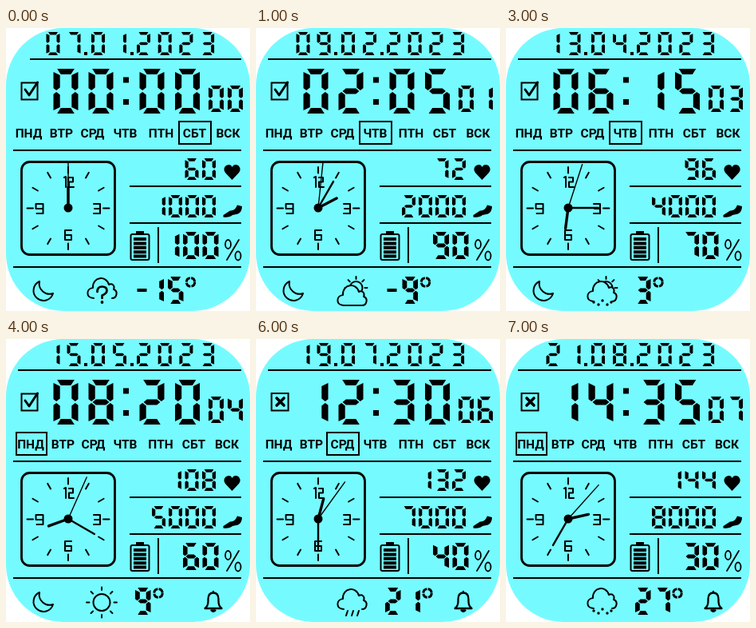
Write an HTML page that moves like this. It is 306x354 px and loops after 8 s.

```html
<!DOCTYPE html>
<html lang="ru">
<head>
<meta charset="utf-8">
<title>Watch face</title>
<style>
  html, body { margin: 0; width: 100%; height: 100%; overflow: hidden; background: #fff; }
  svg { display: block; width: 306px; height: 354px; }
  text { font: 700 15.5px Roboto, "Open Sans", sans-serif; text-anchor: middle; }
  .line { fill: none; stroke: #000; stroke-width: 2; stroke-linecap: round; stroke-linejoin: round; }
  .flat { stroke-linecap: butt; stroke-linejoin: miter; }
  .paper { fill: #75fbff; }
</style>
</head>
<body>
<svg viewBox="0 0 306 354">
  <rect class="paper" width="306" height="354" rx="72"/>
  <path id="topLine" class="line flat"/>
  <path class="line flat" d="M9 153H295M155 198H295M155 244H295M9 299H295M191 249V294"/>
  <path id="digits"/>
  <g id="days"></g>
  <rect id="dayBox" class="line flat" y="117" height="28"/>
  <g id="check"></g>

  <rect class="line" x="19.500" y="167.500" width="117" height="116" rx="10" style="stroke-width:2.8"/>
  <path id="ticks" class="line"/>
  <path class="line" d="M73 187l2-1v13M79 187h5v5.500h-5v6.500h6M110 220h8v12h-8M111 226h7M46.500 226h-9v-6h9v12h-8M82 253h-8v12h8v-6h-8"/>
  <path id="hourHand" class="line" style="stroke-width:3.4"/>
  <path id="minuteHand" class="line" style="stroke-width:2.4"/>
  <path id="secondHand" class="line" style="stroke-width:1.4"/>
  <circle cx="78" cy="225" r="5.500"/>

  <path d="M283.500 190L275 181C271 175 276 171 279.500 171Q282.500 171 283.500 174Q285 171 288 171C292 171 296 176 292 181Z"/>
  <path d="M272.500 236.500V234L281 228.500Q287 229 290 221.500L296 223Q296 230 291 232.500L284 234Q280 237.500 272.500 236.500Z"/>
  <rect class="line" x="156.500" y="258" width="23" height="32" rx="2"/>
  <path d="M163 254h10v4h-10zM160 262h16v4h-16zM160 267.400h16v4h-16zM160 272.800h16v4h-16zM160 278.200h16v4h-16zM160 283.600h16v4h-16z"/>
  <g class="line" style="stroke-width:1.800">
    <ellipse cx="278.500" cy="270.500" rx="3.500" ry="5.500"/>
    <ellipse cx="291" cy="285" rx="3.500" ry="5.500"/>
    <path d="M292 265L277 290"/>
  </g>

  <path id="moon" class="line" d="M42 317A12.500 12.500 0 1 0 59 332A13 13 0 0 1 42 317Z"/>
  <g id="bell" class="line" style="stroke-width:2.3">
    <path d="M249.500 337Q253.500 334 253.500 328V325.500Q253.500 317.500 260 317.500Q266.500 317.500 266.500 325.500V328Q266.500 334 270.500 337ZM260 317V316"/>
    <path d="M257.500 339.500Q260 342 262.500 339.500Z"/>
  </g>
  <g id="weather"></g>
  <circle id="degree" class="line flat" cy="318" r="5.200" style="stroke-width:3" stroke-dasharray="6.900 1.268"/>
</svg>
<script>
const STEP = 1000, STEPS = 8;
const $ = id => document.getElementById(id);
const pad = n => String(n).padStart(2, "0");

// Lit segments, a to g, clockwise from the top.
const LIT = ["abcdef", "bc", "abdeg", "abcdg", "bcfg", "acdfg", "acdefg", "abc", "abcdefg", "abcdfg"];

function digit(n, x, y, w, h, t) {
  const g = Math.max(0.7, t * 0.12), u = t * 0.85, m = h / 2;
  const bar = [[t * 0.45 + g, 0], [w - t * 0.45 - g, 0], [w - t - g, u], [t + g, u]];
  const side = [[0, u * 0.45 + g], [t, u + g], [t, m - u / 2 - g], [t * 0.45, m - g], [0, m - u * 0.4 - g]];
  const flipX = p => p.map(([a, b]) => [w - a, b]);
  const flipY = p => p.map(([a, b]) => [a, h - b]);
  const segs = {
    a: bar, d: flipY(bar),
    f: side, b: flipX(side), e: flipY(side), c: flipX(flipY(side)),
    g: [[t * 0.5 + g, m], [t + g, m - u / 2], [w - t - g, m - u / 2],
        [w - t * 0.5 - g, m], [w - t - g, m + u / 2], [t + g, m + u / 2]]
  };
  return [...LIT[n]].map(s =>
    "M" + segs[s].map(([a, b]) => (x + a).toFixed(2) + " " + (y + b).toFixed(2)).join("L") + "Z").join("");
}

const row = (s, x, y, pitch, w, h, t) =>
  [...String(s)].map((c, i) => digit(+c, x + i * pitch, y, w, h, t)).join("");
const rowEnd = (s, right, y, pitch, w, h, t) =>
  row(s, right - w - (String(s).length - 1) * pitch, y, pitch, w, h, t);
const box = (x, y, w, h) => `M${x} ${y}h${w}v${h}h${-w}z`;

function ray(cx, cy, deg, from, to) {
  const a = deg * Math.PI / 180, s = Math.sin(a), c = Math.cos(a);
  return `M${cx + s * from} ${cy - c * from}L${cx + s * to} ${cy - c * to}`;
}
const rays = (cx, cy, n, from, to) =>
  Array.from({ length: n }, (_, i) => ray(cx, cy, i * 360 / n, from, to)).join("");

const stroke = (d, extra = "") => `<path class="line" d="${d}" ${extra}/>`;
const CLOUD = "M110 342C100 342 100 330 109 329C108 315 126 313 129 325C133 323 137 326 135 331C141 333 139 342 133 342";
const sun = (x, y, r, n, from, to) =>
  `<circle class="line" cx="${x}" cy="${y}" r="${r}"/>` + stroke(rays(x, y, n, from, to));
const cloud = (dy, closed) =>
  `<g transform="translate(0 ${dy})">${stroke(CLOUD + (closed ? "Z" : ""), 'style="fill:#75fbff"')}</g>`;
const drops = y => stroke(`M115 ${y}l-2 6M122 ${y}l-2 6M129 ${y}l-2 6`);
const flakes = y => [[110, 2], [116, 5], [121, 0], [127, 5], [132, 2]]
  .map(([x, d]) => `<circle cx="${x}" cy="${y + d}" r="1.700"/>`).join("");
const smallSun = sun(125.5, 325, 8, 8, 11, 14);

const WEATHER = [
  cloud(-4) + stroke("M114.500 330Q114.500 323.500 120.500 323.500Q126.500 323.500 126.500 328.500Q126.500 332 120.500 334.500V338", 'style="stroke-width:2.7"') +
    '<circle cx="120.500" cy="343" r="1.900"/>',
  smallSun + cloud(5, true),
  smallSun + cloud(0) + drops(342),
  smallSun + cloud(0) + flakes(341),
  sun(120, 329.5, 10.5, 8, 15.5, 19),
  cloud(0, true),
  cloud(-4) + drops(340),
  cloud(-5) + flakes(338)
];

const DAYS = [["ПНД", 28.5], ["ВТР", 69.5], ["СРД", 108.5], ["ЧТВ", 149.5], ["ПТН", 194.5], ["СБТ", 236.5], ["ВСК", 278.5]];
const MONDAY_SHIFT = [2.5, 2, 1, 0, -0.5, -1, -1.5];

const CHECKED = '<rect class="line flat" x="19.500" y="68.500" width="20" height="21"/>' +
  stroke("M24 77L29 84L39.500 68", 'style="stroke-width:3"');
const CROSSED = '<rect class="line flat" x="19.500" y="68" width="21" height="21.500"/>' +
  stroke("M26 74L35 83M35 74L26 83", 'style="stroke-width:3.6"');

$("ticks").setAttribute("d", rays(78, 225.5, 12, 44, 51.5));

function hand(id, deg, len) {
  $(id).setAttribute("d", ray(78, 225, deg, 0, len));
}

function draw(i) {
  const day = 7 + 2 * i, month = i + 1, hour = 2 * i, minute = 5 * i, temp = 6 * i - 15;
  const weekday = (new Date(Date.UTC(2023, i, day)).getUTCDay() + 6) % 7;

  const tempText = String(Math.abs(temp)), places = tempText.length;
  const tempX = temp < 0 ? 188.5 - 5 * places : 162;
  $("digits").setAttribute("d",
    row(pad(day), 50.5, 5, 26, 17, 29, 4) + box(98, 30, 4, 4) +
    row(pad(month), 107, 5, 27, 17, 29, 4) + box(156, 30, 4, 4) +
    row(2023, 164, 5, 26.7, 17, 29, 4) +
    row(pad(hour), 59.5, 51, 44, 31, 56, 8.2) +
    box(147, 61.5, 7, 7) + box(147, 89, 7, 7) +
    row(pad(minute), 167.5, 51, 44.5, 31, 56, 8.2) +
    row(pad(i), 254, 72, 24, 19, 33, 5) +
    rowEnd(60 + 12 * i, 263, 163, 21.5, 17, 27, 4.3) +
    rowEnd(1000 * (i + 1), 263, 209, 21, 17, 28, 4.3) +
    rowEnd(100 - 10 * i, 266.5, 255, 24.5, 20, 34, 5.6) +
    (temp < 0 ? box(164.5, 326, 12, 4) : "") +
    row(tempText, tempX, 311, 24.5, 19.5, 34, 5.8));
  $("degree").setAttribute("cx", tempX + 29 + 24 * (places - 1));

  $("topLine").setAttribute("d", `M${i ? 15 : 30} 39H295`);
  $("days").innerHTML = DAYS.map(([name, x], k) =>
    `<text x="${x + (weekday ? 0 : MONDAY_SHIFT[k])}" y="${k < 4 ? 137 : 136.5}">${name}</text>`).join("");
  $("dayBox").setAttribute("x", weekday ? DAYS[weekday][1] - 19.5 : 13);
  $("dayBox").setAttribute("width", weekday ? 40 : 38);

  $("check").innerHTML = i < 5 ? CHECKED : CROSSED;
  $("moon").style.display = i < 5 ? "" : "none";
  $("bell").style.display = i < 4 ? "none" : "";
  $("weather").innerHTML = WEATHER[i];

  hand("hourHand", hour * 30 + minute / 2, 26);
  hand("minuteHand", minute * 6, 38);
  hand("secondHand", i * 6, 57);
}

let shown = -1;
const start = performance.now();
function tick() {
  const i = Math.floor((performance.now() - start) / STEP) % STEPS;
  if (i !== shown) draw(shown = i);
  requestAnimationFrame(tick);
}
tick();
</script>
</body>
</html>
```
